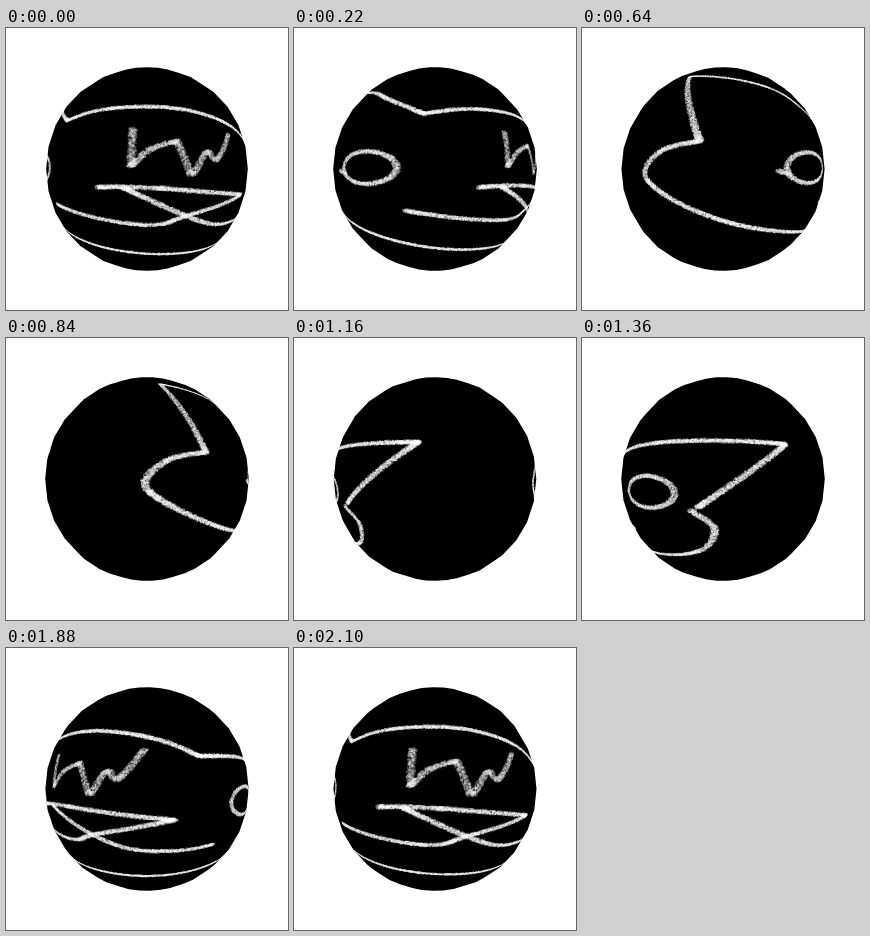
An HTML page with a canvas for the animation above (2120 ms loop, 282 by 282 pixels).

```html
<!DOCTYPE html>
<html>
<head>
<meta charset="utf-8">
<style>
  html, body { margin: 0; width: 100%; height: 100%; overflow: hidden; background: #fff; }
  canvas { display: block; }
</style>
</head>
<body>
<canvas id="stage" width="282" height="282"></canvas>
<script>
const SIZE = 282, MID = SIZE / 2, LOOP = 2120, STEP = 20, TAU = Math.PI * 2;
// Perspective camera with a 60 degree field of view; the ball radius is a third of the stage.
const FOCAL = MID * Math.sqrt(3), DIST = FOCAL / (SIZE / 3);
const TW = 1024, TH = 512;
const ctx = document.getElementById('stage').getContext('2d');

function makeCanvas(w, h) {
  const c = document.createElement('canvas');
  c.width = w;
  c.height = h;
  return c.getContext('2d', { willReadFrequently: true });
}

const turn = ms => TAU * ms / LOOP;

// Stage point to [longitude, latitude] on the unmoved ball.
function unproject(x, y) {
  const X = (x - MID) / FOCAL, Y = (y - MID) / FOCAL, q = 1 + X * X + Y * Y;
  const s = (DIST - Math.sqrt(Math.max(0, DIST * DIST - q * (DIST * DIST - 1)))) / q;
  return [Math.atan2(X * s, DIST - s), Math.asin(Math.max(-1, Math.min(1, Y * s)))];
}

let seed = 7;
const rand = () => (seed = (seed * 1664525 + 1013904223) % 4294967296) / 4294967296;

const skin = makeCanvas(TW, TH);
skin.fillStyle = '#fff';

// A flat oval of chalk grains.
function dab(lon, lat) {
  for (let i = 0; i < 14; i++) {
    const r = Math.sqrt(rand()), a = rand() * TAU;
    const x = lon / TAU * TW + 5 * r * Math.cos(a);
    const y = (lat / Math.PI + 0.5) * TH + 2.6 * r * Math.sin(a);
    skin.fillRect((x % TW + TW) % TW - 0.6, y - 0.6, 1.3, 1.3);
  }
}

const spline = (a, b, c, d, t) =>
  b + t / 2 * (c - a + t * (2 * a - 5 * b + 4 * c - d + t * (3 * (b - c) + d - a)));

// Each view is [ms, x, y, x, y, ...]: key points as seen on the stage at that time.
function chalk(tone, ...views) {
  const pts = [];
  for (const [ms, ...xy] of views) {
    for (let i = 0; i < xy.length; i += 2) {
      let [lon, lat] = unproject(xy[i], xy[i + 1]);
      lon -= turn(ms);
      if (pts.length) lon += TAU * Math.round((pts[pts.length - 1][0] - lon) / TAU);
      pts.push([lon, lat]);
    }
  }
  skin.globalAlpha = tone;
  const at = i => pts[Math.max(0, Math.min(pts.length - 1, i))];
  for (let i = 0; i < pts.length - 1; i++) {
    const [a, b, c, d] = [at(i - 1), at(i), at(i + 1), at(i + 2)];
    const n = Math.ceil(Math.hypot(c[0] - b[0], c[1] - b[1]) * TW / TAU);
    for (let k = 0; k < n; k++) {
      dab(spline(a[0], b[0], c[0], d[0], k / n), spline(a[1], b[1], c[1], d[1], k / n));
    }
  }
}

function oval(tone, ms, cx, cy, rx, ry) {
  const view = [ms];
  for (let i = 0; i <= 12; i++) {
    const a = Math.PI + i / 12 * TAU;
    view.push(cx + rx * Math.cos(a), cy + ry * Math.sin(a));
  }
  chalk(tone, view);
}

const BODY = 0.43, MOUTH = 0.38, ZIGZAG = 0.3, EYE = 0.34;

// Tail, belly, second tail edge, back
chalk(BODY, [1160, 124, 104, 53, 166]);
chalk(BODY, [1560, 192, 172, 206, 188, 185, 211, 130, 223], [1880, 140, 228], [0, 105, 221],
  [440, 140, 209], [840, 205, 186, 142, 152, 160, 123, 200, 114]);
chalk(BODY, [840, 200, 114, 154, 46]);
chalk(BODY, [840, 154, 46], [440, 130, 56, 170, 70, 208, 90]);
chalk(BODY, [440, 208, 90], [0, 100, 81, 175, 81], [1880, 150, 91, 193, 108]);
chalk(BODY, [1880, 193, 108], [1560, 150, 102], [1160, 124, 104]);

// Both sides of the mouth
chalk(MOUTH, [0, 92, 159, 150, 160], [1880, 168, 172]);
chalk(MOUTH, [1880, 168, 172, 90, 186], [0, 140, 197], [440, 199, 181]);
chalk(MOUTH, [0, 118, 160], [1880, 110, 197, 165, 203], [1560, 95, 199]);

chalk(ZIGZAG, [0, 127, 101, 125, 138]);
chalk(ZIGZAG, [0, 125, 138, 145, 121, 171, 113]);
chalk(ZIGZAG, [0, 171, 113, 185, 147]);
chalk(ZIGZAG, [1880, 85, 146, 101, 123, 112, 131, 139, 101]);

oval(EYE, 440, 159, 139.5, 38, 17.5);
chalk(EYE, [440, 111, 143, 126, 147]);
oval(EYE, 1560, 140.5, 155, 38, 17.5);

const ink = skin.getImageData(0, 0, TW, TH).data;

// Rays through the ball's box, two per pixel each way.
const LEFT = 38, BOX = 206, N = BOX * 2;
const layer = makeCanvas(N, N), image = layer.createImageData(N, N);
image.data.fill(255);
const cols = new Float32Array(N * N), rows = new Int32Array(N * N);
for (let i = 0; i < N * N; i++) {
  const [lon, lat] = unproject(LEFT + (i % N + 0.5) / 2, LEFT + (Math.floor(i / N) + 0.5) / 2);
  cols[i] = (lon / TAU + 2) * TW;
  rows[i] = Math.min(TH - 1, Math.floor((lat / Math.PI + 0.5) * TH)) * TW;
}

function vertex(j, k, angle) {
  const lat = (j / 16 - 0.5) * Math.PI, lon = k / 24 * TAU + angle;
  const f = FOCAL / (DIST - Math.cos(lat) * Math.cos(lon));
  return [MID + f * Math.cos(lat) * Math.sin(lon), MID + f * Math.sin(lat)];
}

// The ball is a 24 by 16 mesh, so its outline is slightly angular.
function fillBall(angle) {
  ctx.beginPath();
  for (let j = 0; j < 16; j++) {
    for (let k = 0; k < 24; k++) {
      const q = [vertex(j, k, angle), vertex(j, k + 1, angle),
        vertex(j + 1, k + 1, angle), vertex(j + 1, k, angle)];
      const facing = (q[2][0] - q[0][0]) * (q[3][1] - q[1][1]) -
        (q[2][1] - q[0][1]) * (q[3][0] - q[1][0]);
      if (facing <= 0) continue;
      q.forEach(([x, y], i) => i ? ctx.lineTo(x, y) : ctx.moveTo(x, y));
      ctx.closePath();
    }
  }
  ctx.fillStyle = '#000';
  ctx.fill();
}

function draw() {
  const angle = turn(Math.floor(performance.now() % LOOP / STEP) * STEP);
  const shift = angle / TAU * TW;
  for (let i = 0; i < N * N; i++) {
    const col = Math.floor(cols[i] - shift) % TW;
    image.data[i * 4 + 3] = ink[(rows[i] + col) * 4 + 3];
  }
  layer.putImageData(image, 0, 0);
  ctx.clearRect(0, 0, SIZE, SIZE);
  fillBall(angle);
  ctx.globalCompositeOperation = 'source-atop';
  ctx.drawImage(layer.canvas, LEFT, LEFT, BOX, BOX);
  ctx.globalCompositeOperation = 'source-over';
  requestAnimationFrame(draw);
}
draw();
</script>
</body>
</html>
```
